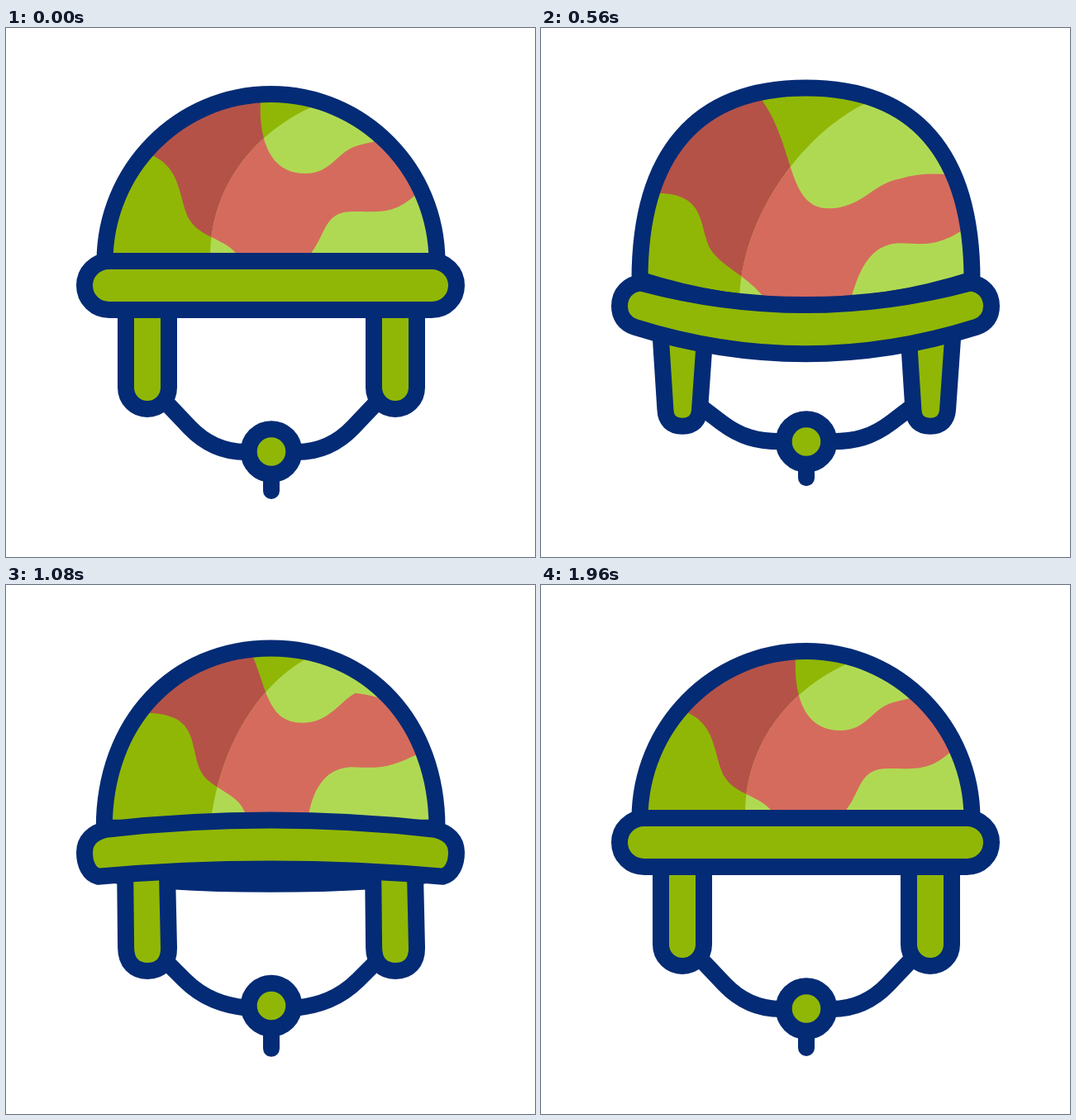
Write an HTML page with a canvas that moves like this. It is 640 by 640 pixels and loops after 2 s.

```html
<!DOCTYPE html>
<html>
<head>
<meta charset="utf-8">
<style>
html, body { margin: 0; width: 100%; height: 100%; overflow: hidden; background: #fff }
canvas { display: block }
</style>
</head>
<body>
<canvas width="640" height="640"></canvas>
<script>
const ctx = document.querySelector('canvas').getContext('2d');
const NAVY = '#042b75', GREEN = '#90b706', LIME = '#b0d953', BRICK = '#b45248', CORAL = '#d56b5d';

// Each shape in three poses: level, nodding forward, tilted back
const shapes = {
  dome: [
    'M119.5 283C119.5 171 209.5 80 320.5 80C431.5 80 521.5 171 521.5 283Q320 283 119.5 283Z',
    'M119.5 305C119.5 152 187.5 72.5 320.5 72.5C453.5 72.5 521.5 152 521.5 305Q320 370 119.5 305Z',
    'M118.5 289C118.5 172 209 78 320.5 78C432 78 521.5 172 521.5 289Q320 270 118.5 289Z'],
  shine: [
    'M400 84C310 112 248 185 247 275L247 360L560 360L560 40Z',
    'M410 84C330 112 245 218 240 325L240 360L560 360L560 40Z',
    'M374 78C305 104 266 180 251 268L245 360L560 360L560 40Z'],
  camo: [
    'M160 149C215 160 207 205 222 232C234 252 262 255 277 271L290 300L360 300L370 271C388 247 385 222 420 222C455 222 470 226 500 198L560 160L470 134Q448 136 430 141C400 147 396 176 362 176C325 176 305 145 308 85L300 40L120 40Z',
    'M125 201C205 195 188 240 206 270C218 288 250 302 268 325L275 350L372 350L376 325C386 290 400 264 430 261C455 260 475 269 512 244L560 200L505 179Q462 174 435 183C402 188 388 219 348 219C296 219 308 140 264 84L240 40L100 40Z',
    'M180 136C246 138 234 172 247 207C256 230 296 232 298 258L300 300L362 300L362 260C368 222 385 205 412 204C440 205 450 208 496 187L560 150L445 124Q430 116 418 110C402 124 392 146 362 146C322 146 318 112 308 78L300 40L120 40Z'],
  band: [
    'M125 282C255 282 385 282 515 282C532 282 545 295 545 311.5C545 328 532 341 515 341C385 341 255 341 125 341C108 341 95 328 95 311.5C95 295 108 282 125 282Z',
    'M121 309C254 345 386 345 519 309C534 310 545 321 545 337C545 349 539 358 527 362C389 406 251 406 113 362C101 358 95 349 95 337C95 321 106 310 121 309Z',
    'M121 290.5C254 255.5 386 255.5 519 290.5C535 295 545 304 545 318C545 334 539 347 529 349C389 314.5 251 314.5 111 349C101 347 95 334 95 318C95 304 105 295 121 290.5Z'],
  brim: [
    'M125 330C190 330 450 330 515 330V310H125Z',
    'M125 345C190 345 450 345 515 345V340H125Z',
    'M115 349C180 375 460 375 525 349V310H115Z'],
  strap: [
    'M145 335L145 435C145 450 157 461 171 461C185 461 197 450 197 435L197 335Z',
    'M144.5 370L150.5 462C151 475 158 482 171 482C184 482 191 475 192 462L198.5 370Z',
    'M144 335L143 430C143 449 154 461 171 461C189 461 200 449 199 430L193.5 335Z'],
  chin: [
    'M185 444L222 483C241 503 263 513 290 513',
    'M185 452L218 477C242 495 262 500 290 500',
    'M185 445L215 478C238 503 265 512 290 516'],
  tip: ['M321 530L321 560', 'M321 518L321 544', 'M321 530L321 567.5']
};
const knobY = [512.5, 500.3, 512.5];
const keys = [[150, 0], [600, 1], [1400, 2], [1960, 0]];

const lerp = (a, b, u) => a + (b - a) * u;

function ease(u) {
  u = u ** 0.85;
  return u * u * (3 - 2 * u);
}

// Returns the pose left behind, the pose ahead and the progress between them
function poseAt(t) {
  for (let i = 0; i < 3; i++) {
    const [start, from] = keys[i], [end, to] = keys[i + 1];
    if (t >= start && t < end) return [from, to, ease((t - start) / (end - start))];
  }
  return [0, 0, 0];
}

function morph(poses, [from, to, u]) {
  const ahead = poses[to].match(/[\d.]+/g);
  let i = 0;
  return new Path2D(poses[from].replace(/[\d.]+/g, n => lerp(+n, +ahead[i++], u).toFixed(2)));
}

function paint(path, fill) {
  if (fill) {
    ctx.fillStyle = fill;
    ctx.fill(path);
  }
  ctx.stroke(path);
}

function draw(t) {
  const pose = poseAt(t), p = {};
  for (const name in shapes) p[name] = morph(shapes[name], pose);

  ctx.fillStyle = '#fff';
  ctx.fillRect(0, 0, 640, 640);
  ctx.strokeStyle = NAVY;
  ctx.lineWidth = 20;
  ctx.lineCap = ctx.lineJoin = 'round';

  paint(p.chin);
  ctx.save();
  ctx.translate(642, 0);
  ctx.scale(-1, 1);
  paint(p.chin);
  ctx.restore();
  paint(p.tip);
  const knob = new Path2D();
  knob.arc(321, lerp(knobY[pose[0]], knobY[pose[1]], pose[2]), 27.3, 0, 7);
  paint(knob, GREEN);

  paint(p.brim, GREEN);
  paint(p.strap, GREEN);
  ctx.save();
  ctx.translate(300, 0);
  paint(p.strap, GREEN);
  ctx.restore();

  ctx.save();
  ctx.clip(p.dome);
  for (const [base, patch] of [[GREEN, BRICK], [LIME, CORAL]]) {
    if (base === LIME) ctx.clip(p.shine);
    ctx.fillStyle = base;
    ctx.fillRect(0, 0, 640, 640);
    ctx.fillStyle = patch;
    ctx.fill(p.camo);
  }
  ctx.restore();
  paint(p.dome);
  paint(p.band, GREEN);
}

const began = performance.now();
function tick() {
  draw((performance.now() - began) % 2000);
  requestAnimationFrame(tick);
}
tick();
</script>
</body>
</html>
```
